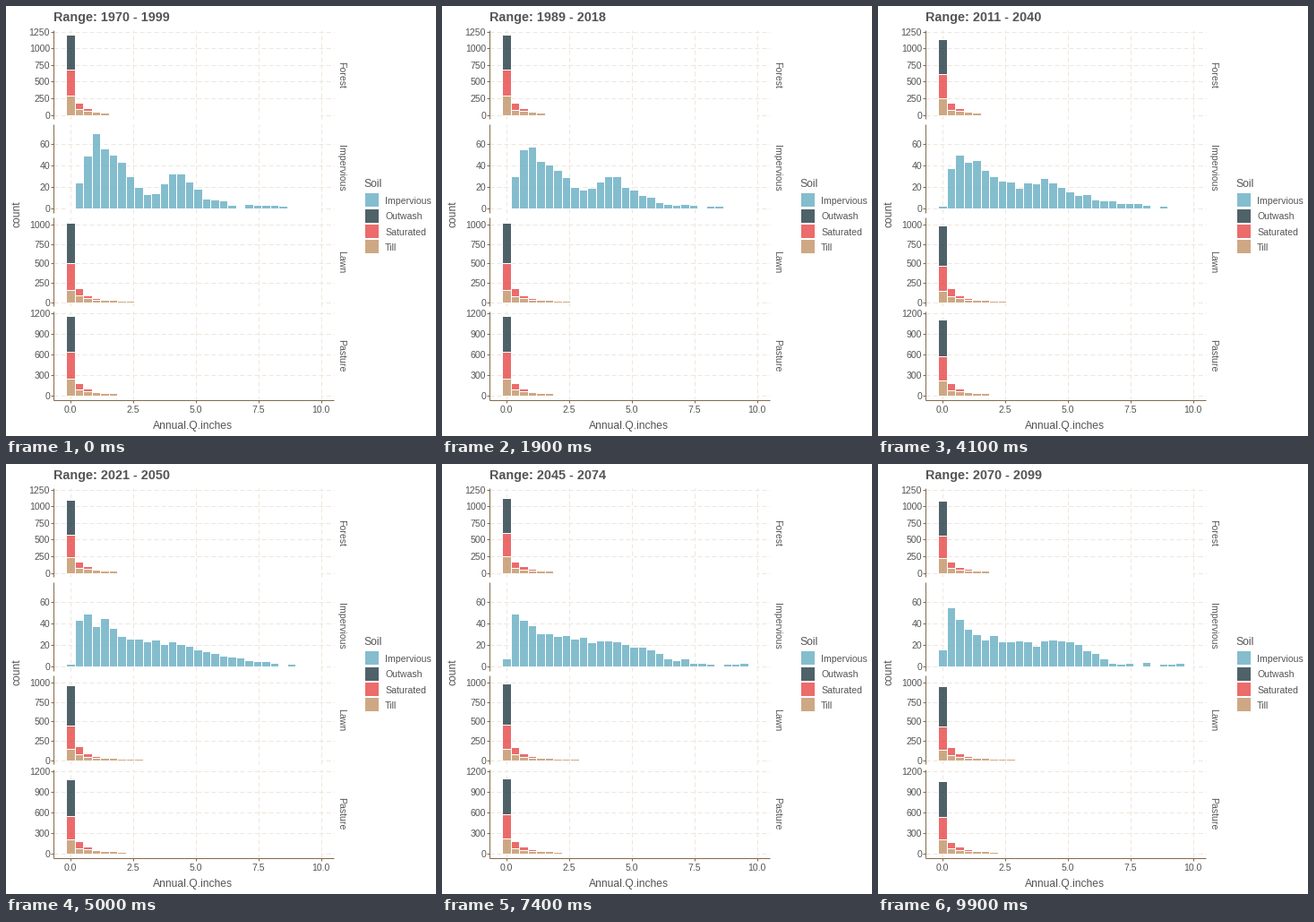
These frames come from a looping animation (480 by 480 pixels, 10 s). A matplotlib script:

```python
import numpy as np
import matplotlib.pyplot as plt
from matplotlib.animation import FuncAnimation
from matplotlib.patches import Rectangle

SIZE, FRAMES, BINS, SPAN = 480, 100, 30, 30
FIRST_YEAR, STEPS = 1970, 100
PT = 0.72                       # points per pixel at 100 dpi
LEFT, RIGHT = 53.3, 366
X0, X_UNIT, BIN_W = 72.07, 28.0, 9.47
PANEL_H, PANEL_STEP, FIRST_TOP = 99, 104.5, 27

TEXT, LINE, GRID = "#555555", "#826A50", "#EFE6DC"
DASH = (0, (5, 3))
SOILS = {"Impervious": "#65ADC2", "Outwash": "#233B43",
         "Saturated": "#E84646", "Till": "#C29365"}

# name, zero line, pixels per count, ticks
PANELS = [
    ("Forest", 121.6, 0.0744, range(0, 1251, 250)),
    ("Impervious", 225.7, 1.2, range(0, 61, 20)),
    ("Lawn", 330.55, 0.0862, range(0, 1001, 250)),
    ("Pasture", 434.7, 0.0767, range(0, 1201, 300)),
]

# zero-bin counts (till, saturated), their loss over time, tail length, decay
COVER = {
    "Forest": (285, 392, 60, 61, 4, 0.62),
    "Lawn": (155, 348, 18, 50, 7, 0.45),
    "Pasture": (245, 390, 45, 62, 5, 0.62),
}
DRY = 525                       # outwash count, always in the zero bin

# outline of the impervious histogram at a few start years
KNOTS = [0, 1, 2, 3, 6, 9.5, 12.5, 16, 19, 24, 28]
OUTLINE = {
    1970: [0, 25, 50, 65, 37, 11, 34, 12, 3, 2, 0],
    1990: [0, 27, 58, 53, 35, 14, 35, 12, 4, 2, 0],
    2025: [1, 45, 46, 40, 30, 25, 22, 14, 10, 2, 1],
    2070: [14, 58, 43, 35, 25, 22, 26, 23, 5, 2, 2],
}

rng = np.random.default_rng(4)
shocks = rng.normal(size=(STEPS + SPAN, BINS))
bins = np.arange(BINS)


def hard_counts(step):
    """Outline blended over time, roughened by the years inside the window."""
    year = FIRST_YEAR + step
    knots = [np.interp(year, list(OUTLINE), v) for v in zip(*OUTLINE.values())]
    mean = np.interp(bins, KNOTS, knots, right=0)
    rough = shocks[step:step + SPAN].sum(axis=0) / np.sqrt(SPAN)
    return np.maximum(np.round(mean + 0.55 * rough * np.sqrt(mean)), 0)


def cover_counts(name, step):
    """Outwash, saturated and till counts: a tall zero bin and decaying tails."""
    till0, sat0, till_loss, sat_loss, reach, decay = COVER[name]
    t = step / STEPS
    loss = np.interp(step, [20, 51, 75, 100], [0, 0.82, 0.6, 1])
    till = 22 + (62 - 15 * t) * decay ** (bins - 1.0)
    till[bins > reach + round(t)] = 0
    sat = (95 + 8 * t) * 0.43 ** (bins - 1.0)
    sat[bins > 3] = 0
    till[0] = till0 - till_loss * loss
    sat[0] = sat0 - sat_loss * loss
    return [np.where(bins == 0, DRY, 0), sat, till]


def stacks(name, step):
    """Counts per bin, top layer first."""
    if name in COVER:
        return cover_counts(name, step)
    return [hard_counts(step)]


plt.rcParams["font.family"] = "Liberation Sans"
fig = plt.figure(figsize=(SIZE / 100, SIZE / 100), dpi=100, facecolor="white")
ax = fig.add_axes([0, 0, 1, 1])
ax.set_xlim(0, SIZE)
ax.set_ylim(SIZE, 0)
ax.axis("off")


def line(x, y, color, z, style="-"):
    ax.plot(x, y, color=color, lw=PT, ls=style, zorder=z,
            solid_capstyle="butt", dash_capstyle="butt")


def label(x, y, s, size=10.5, ha="left", **kw):
    return ax.text(x, y, s, fontsize=size * PT, ha=ha, va="baseline",
                   color=TEXT, rotation_mode="anchor", **kw)


def bar(x, y, w, h, soil):
    return ax.add_patch(Rectangle((x, y), w, h, fc=(SOILS[soil], 0.8),
                                  ec="white", lw=PT, zorder=2))


x_ticks = [(v, X0 + v * X_UNIT) for v in np.arange(0, 10.1, 2.5)]
bars = {}
for i, (name, zero, scale, ticks) in enumerate(PANELS):
    top = FIRST_TOP + i * PANEL_STEP
    bottom = top + PANEL_H
    for v in ticks:
        y = zero - v * scale
        line([LEFT, RIGHT], [y, y], GRID, 1, DASH)
        line([LEFT - 3, LEFT], [y, y], LINE, 3)
        label(49, y + 4, str(v), ha="right")
    for _, x in x_ticks:
        line([x, x], [bottom, top], GRID, 1, DASH)
    line([LEFT, LEFT], [bottom, top], LINE, 3)
    label(371.5, (top + bottom) / 2, name, ha="center", rotation=270)

    layers = list(SOILS)[1:] if name in COVER else ["Impervious"]
    bars[name] = [[bar(X0 + (k - 0.5) * BIN_W, zero, BIN_W, 0, soil)
                   for k in bins] for soil in layers]

line([LEFT, RIGHT], [bottom, bottom], LINE, 3)
for v, x in x_ticks:
    line([x, x], [bottom, bottom + 3], LINE, 3)
    label(x - 0.4, 454, f"{v:.1f}", ha="center")
label(208.5, 472, "Annual.Q.inches", 12.1, "center")
label(16, 232.5, "count", 12.1, "center", rotation=90)

label(399, 202, "Soil", 12.1)
for i, soil in enumerate(SOILS):
    y = 208.4 + 17.28 * i
    bar(400.4, y, 15.9, 15.9, soil)
    label(423, y + 12.6, soil)

title = label(53, 17, "", 14.4, weight="bold")


def update(frame):
    step = round(frame * STEPS / (FRAMES - 1))
    year = FIRST_YEAR + step
    title.set_text(f"Range: {year} - {year + SPAN - 1}")
    for name, zero, scale, _ in PANELS:
        floor = np.full(BINS, zero)
        for counts, rects in zip(stacks(name, step)[::-1], bars[name][::-1]):
            heights = counts * scale
            floor = floor - heights
            for rect, y, h in zip(rects, floor, heights):
                rect.set_y(y)
                rect.set_height(h)
    return []


anim = FuncAnimation(fig, update, frames=FRAMES, interval=100, repeat=True,
                     repeat_delay=0, blit=False)
plt.show()
```
